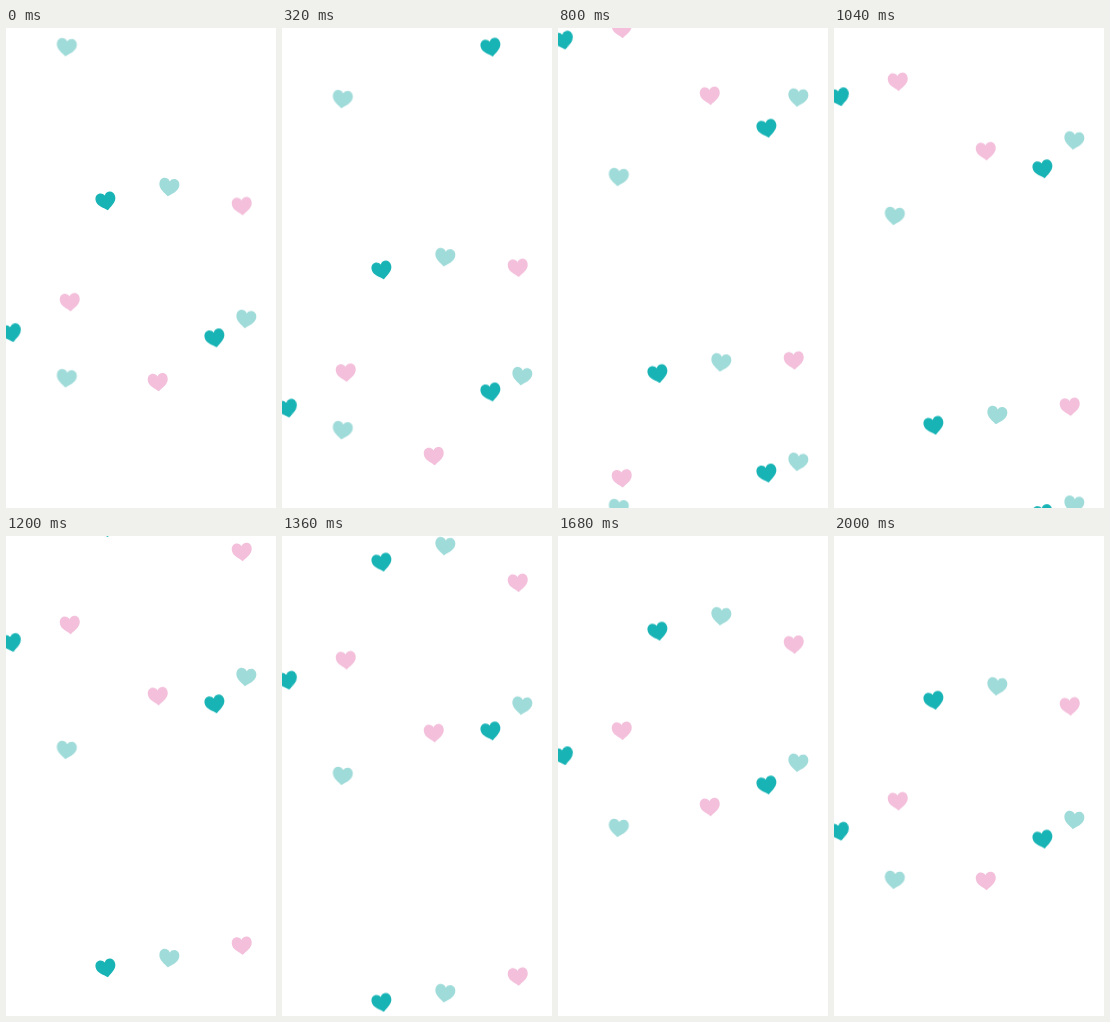
Animation, 270 px wide and 480 px high, one loop 2040 ms. Source, as an HTML page:

```html
<!DOCTYPE html>
<html lang="en">
<head>
<meta charset="utf-8">
<title>Falling hearts</title>
<style>
  html, body { margin: 0; width: 100%; height: 100%; overflow: hidden; background: #fff; }
  svg { display: block; width: 270px; height: 480px; }
</style>
</head>
<body>
<svg id="stage" viewBox="0 0 270 480"></svg>
<script>
const NS = "http://www.w3.org/2000/svg";
const LOOP = 2040;
const STEP = 40;
const HEART = "M0 9.2C-3 6.4-10 3.2-10-2.8C-10-10-2-10.4 0-5.8C2-10.4 10-10 10-2.8C10 3.2 3 6.4 0 9.2Z";

const KINDS = {
  light: { fill: "#9fdbd9", tilt: 7 },
  teal: { fill: "#18b3b5", tilt: -12 },
  pink: { fill: "#f3bfdb", tilt: -5 }
};

// kind, x, y at the start of the loop, distance fallen per loop
const HEARTS = [
  ["light", 60.5, 19.2, 331.2],
  ["teal", 209, -34.6, 344.8],
  ["light", 240, -73.3, 364.4],
  ["pink", 152, -117, 471.2],
  ["pink", 64, -175.3, 449.4],
  ["teal", 5.5, -176.3, 481.3],
  ["teal", 100, -267, 440.2],
  ["light", 163, -288, 447.2],
  ["pink", 236, -215.6, 393.7]
];

const stage = document.getElementById("stage");

function add(parent, tag, attrs = {}) {
  const el = document.createElementNS(NS, tag);
  for (const key in attrs) el.setAttribute(key, attrs[key]);
  return parent.appendChild(el);
}

for (const [kind, x, y, fall] of HEARTS) {
  const { fill, tilt } = KINDS[kind];
  const group = add(stage, "g", { fill });
  // The lower heart is one loop ahead of the upper one.
  for (const ahead of [0, fall]) {
    add(group, "path", { d: HEART, transform: `translate(0 ${ahead}) rotate(${tilt})` });
  }
  group.animate(
    [
      { transform: `translate(${x}px, ${y}px)` },
      { transform: `translate(${x}px, ${y + fall}px)` }
    ],
    { duration: LOOP, iterations: Infinity, easing: `steps(${LOOP / STEP})` }
  );
}
</script>
</body>
</html>
```
